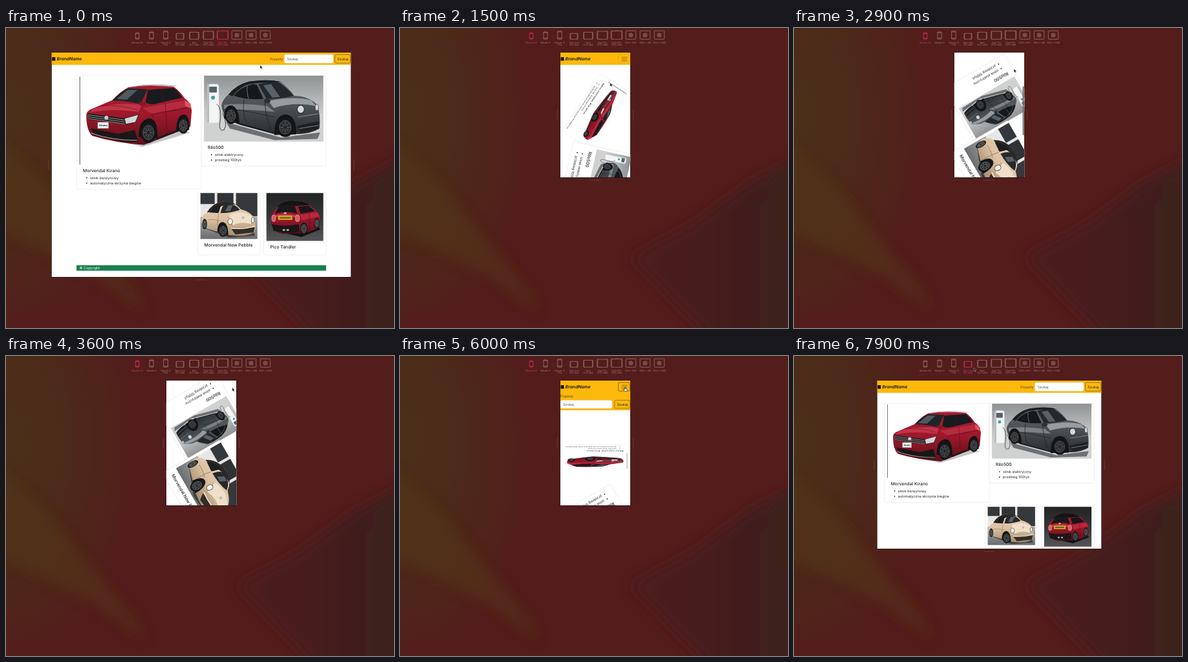
An HTML page for the animation above (8 s loop, 600 by 464 pixels).

```html
<!DOCTYPE html>
<html lang="pl">
<head>
<meta charset="utf-8">
<style>
html, body { margin: 0; width: 100%; height: 100%; overflow: hidden; background: #531d1c; }
svg { display: block; font-family: Inter, "Liberation Sans", sans-serif; text-rendering: geometricPrecision; }
.dev { color: #a9827e; }
.dev.on { color: #e5386a; }
</style>
</head>
<body>
<svg id="stage" width="600" height="464" viewBox="0 0 600 464"></svg>
<script>
const TOP = 38;

// ---- small builders ----
const text = (x, y, s, size = 5.42, more = '') => `<text x="${x}" y="${y}" font-size="${size}" ${more}>${s}</text>`;
const rect = (x, y, w, h, fill, more = '') => `<rect x="${x}" y="${y}" width="${w}" height="${h}" fill="${fill}" ${more}/>`;
const path = (d, fill, more = '') => `<path d="${d}" fill="${fill}" ${more}/>`;
const line = (d, color, w = 1) => path(d, 'none', `stroke="${color}" stroke-width="${w}" stroke-linecap="round"`);
const oval = (x, y, rx, ry, fill, more = '') => `<ellipse cx="${x}" cy="${y}" rx="${rx}" ry="${ry}" fill="${fill}" ${more}/>`;
const wheel = (x, y, rx, ry) => oval(x, y, rx, ry, '#151618') +
  oval(x, y, rx * .7, ry * .7, '#2b2d30', 'stroke="#6d7174" stroke-width=".7"') +
  line(`M${x - rx * .6} ${y}h${rx * 1.2}M${x} ${y - ry * .6}v${ry * 1.2}M${x - rx * .4} ${y - ry * .4}l${rx * .8} ${ry * .8}M${x + rx * .4} ${y - ry * .4}l${-rx * .8} ${ry * .8}`, '#7d8184', .6) +
  oval(x, y, rx * .18, ry * .18, '#222');
const fade = (id, flat, ...stops) => `<linearGradient id="${id}" x2="${flat}" y2="${1 - flat}">${stops.map((c, i) =>
  `<stop offset="${i / (stops.length - 1)}" stop-color="${c}"/>`).join('')}</linearGradient>`;

// ---- car pictures: width, height, drawing ----
const suv = { w: 184.5, h: 137.5, art:
  rect(.5, 1.5, .9, 136, '#444') +
  path('M16 90L98 110L172 88L150 82Z', '#c4c4c4') +
  path('M11 62Q11 55 18 52L32 46L51 38Q64 24 76 18Q104 13 146 17Q156 24 163 35Q173 41 174 54L172 78Q168 84 154 86L124 98L100 107Q56 104 20 93Q11 84 11 62Z', 'url(#red)') +
  path('M22 51Q58 40 97 45L92 56Q50 50 16 57Z', '#c23347') + line('M34 47Q64 44 90 53', '#861526', .8) +
  path('M51 38.5Q64 25 76 19.5L106 21Q100 32 95 44Q70 38 51 38.5Z', '#1f2428') + path('M58 36L75 22L90 22L74 37Z', '#525a60') +
  path('M106 22L146 19Q155 26 159 34L116 44Q102 45 103 39Z', '#171b1e') +
  line('M127 21L130 41M147 20L151 36', '#3d1018', 1.3) + line('M80 17.5Q112 11.5 148 16', '#a5a6a8', 1.1) +
  path('M98 50L166 38L172 47L112 59Z', '#b52b3f') + line('M112 60L172 49', '#62101c', .9) + line('M133 44L136 88M112 60Q119 72 120 92', '#5c0f1a', .7) +
  path('M13 58L70 66L71 75L15 68Z', '#1d191b') + line('M14 60.5L70 68.5M14 63.5L70 71.5M15 66.5L70 74.5', '#c3c4c6', .7) +
  path('M70 66L92 60L87 72L72 75Z', '#d2d6d9', 'stroke="#221" stroke-width=".9"') +
  path('M17 81L60 90L86 84L91 102L70 102L24 92Z', '#1a1719') + line('M19 89Q50 100 89 100', '#c2c4c5', .9) +
  oval(42, 65, 3, 3, '#c9ccce') +
  rect(28.5, 72, 17, 9.5, '#f6f6f6', 'stroke="#555" stroke-width=".4"') + text(31, 78.5, 'Kirano', 4, 'font-weight="700"') +
  line('M120 97L155 84', '#1a1a1c', 3) + path('M92 95Q92 67 109 66Q122 68 121 96Z', '#141214') + path('M150 84Q151 59 163 60Q171 63 170 84Z', '#141214') +
  path('M163 38L172 43L173 51L164 47Z', '#e0505c') + path('M92 41L103 40L104 45L95 47Z', '#8b1526') +
  wheel(107, 88, 12, 16) + wheel(161, 77, 8.5, 12.5) };

const city = { w: 185, h: 102, art:
  rect(0, 0, 185, 102, 'url(#wall)') + path('M0 70L185 58V102H0Z', '#d0d1d1') +
  path('M34 72L120 96L180 88L176 98L110 100L40 82Z', '#6d7072') +
  rect(5, 13, 18, 60, '#f3f5f5', 'rx="4"') + rect(8, 17, 12, 9, '#526367', 'rx="1"') + oval(14, 34, 3, 3, '#3aa59b') +
  rect(5, 13, 3, 60, '#b5babb', 'rx="1.5"') + line('M20 44Q28 50 25 70Q22 88 31 84Q37 76 29 58', '#3f4446', 1) +
  path('M27 46Q29 36 38 29Q50 14 70 9Q98 5 118 9Q130 18 140 31Q164 32 176 46Q181 62 179 82Q162 92 140 90L112 89L54 74Q30 70 27 46Z', 'url(#steel)') +
  path('M38 29Q50 14 70 9Q98 5 118 9L111 12Q82 9 64 15Q50 23 44 32Z', '#1b1d1f') +
  path('M46 31Q56 18 76 13L82 14L92 36Q66 38 46 31Z', '#16191b') + path('M84 13Q104 9 117 11Q130 20 139 31Q118 36 97 36Z', '#22282c') +
  path('M92 15L104 13L118 33L106 34Z', '#596166') + line('M67 15Q66 26 69 35M83 13L95 37', '#5d6366', 1.2) +
  path('M100 39Q140 31 166 38L174 47Q140 40 108 50Z', '#969da1') + path('M31 45Q60 42 98 47L110 56Q70 52 31 52Z', '#7b8286') +
  line('M62 37Q59 60 66 74M94 38Q95 62 104 84M31 52Q60 52 108 64', '#1f2224', .8) + line('M56 75L112 90', '#141617', 2.4) +
  path('M144 78L178 71L177 83L150 89Z', '#1e2123') + line('M148 82L177 77M146 64L177 59', '#9ca2a5', .8) +
  oval(150, 52, 5.5, 6.2, '#d4d9db', 'stroke="#2a2d2f" stroke-width="1.1"') + oval(175, 49, 2.6, 5, '#d4d9db', 'stroke="#2a2d2f" stroke-width=".7"') +
  oval(98, 39, 5, 3.5, '#2d3134') + path('M109 92Q109 60 127 60Q144 62 143 91Z', '#131516') + path('M31 66Q31 45 43 46Q55 50 55 76Z', '#131516') +
  wheel(126, 80, 13, 15) + wheel(42, 62, 9.5, 13) };

const round = { w: 88, h: 71, art:
  rect(0, 0, 88, 71, '#e6e6e6') + rect(0, 0, 22, 17, '#35383b') + rect(26, 0, 25, 20, '#303336') + rect(55, 0, 33, 36, '#36383b') +
  rect(0, 37, 88, 34, 'url(#floor)') + path('M6 54L44 69L84 66L82 60L40 58Z', '#3f4042') +
  path('M1 42Q3 33 11 30Q18 16 33 13.5Q53 12 62 25Q78 29 83 39Q87 50 84 60Q74 67 56 66L44 65L10 55Q1 51 1 42Z', 'url(#cream)') +
  path('M10 30Q18 16 33 13.5Q47 12 55 18Q34 15 20 29Z', '#2b2725') + path('M14 30Q20 20 32 17.5L28 31Z', '#1c1e20') +
  path('M31 31Q33 20 38 17.5Q53 15 61 26Q48 31 31 31Z', '#25292c') + path('M38 28L43 19L50 19L46 28Z', '#596065') +
  path('M44 34Q64 25 80 36L78 48Q64 43 50 50Z', '#efdfc9') + line('M28 33Q25 46 27 59M12 41Q20 40 30 43', '#927a60', .7) +
  line('M42 36Q48 44 52 58', '#a88f72', .7) + path('M48 56L84 53L82 61L54 64Z', '#332d29') + line('M48 54Q66 57 84 51', '#f4ead9', 1.3) +
  oval(46, 44, 3.6, 4.6, '#f2f3f3', 'stroke="#5d5247" stroke-width=".9"') + oval(81, 42, 2.2, 4.3, '#f2f3f3', 'stroke="#5d5247" stroke-width=".9"') +
  oval(66, 38, 2.1, 2.1, '#b9bcbe') + path('M26 60Q27 44 35 45Q43 47 43 66Z', '#191614') + wheel(35, 58, 7.2, 9.8) + wheel(6.5, 48, 3.8, 8) };

const hatch = { w: 88, h: 74, art:
  rect(0, 0, 88, 74, 'url(#dark)') + path('M10 58L54 68L84 56L76 50Z', '#111213') +
  path('M7 44Q8 30 15 25Q20 15 32 13Q54 11 66 18L77 28Q84 33 83 46L79 55L60 62L26 63Q8 60 7 44Z', 'url(#red)') +
  path('M16 22Q22 14 34 12.5Q56 11 67 18.5L46 20Q30 17 16 22Z', '#121314') + path('M13 32L19 21Q33 17 44 20L48 32Q30 27 13 32Z', '#17191b') +
  path('M49 21L65 19.5L75 28L53 32Z', '#141618') + line('M62 20L66 30', '#4a0d17', 1) +
  path('M10 35Q28 30 47 35L47 38Q28 33 9 39Z', '#cf3a4c') + path('M53 34L79 30L82 36L55 42Z', '#b9283b') +
  rect(18, 35, 22, 6.5, '#cfae2b', 'rx=".6"') + rect(20.5, 37.3, 17, 2, '#5f5118') +
  rect(8.5, 34, 5.5, 10, '#e4565a', 'rx="2.6" stroke="#c6c6c6" stroke-width=".7"') + rect(45, 34, 6, 10, '#e4565a', 'rx="2.6" stroke="#c6c6c6" stroke-width=".7"') +
  path('M8 48Q28 53 50 48L51 60Q28 64 11 58Z', '#1b1618') + oval(27, 57, 2, 1.6, '#a9acae') + oval(33, 57, 2, 1.6, '#a9acae') + oval(29, 31, 2, 1.3, '#c9cbcd') +
  line('M66 32L67 56', '#5a101b', .7) + wheel(58, 55, 5.5, 9.5) + wheel(78, 47, 4, 8.5) };

// ---- page parts ----
const CARS = [
  [suv, 'Morvendal Kirano', ['silnik benzynowy', 'automatyczna skrzynia biegów']],
  [city, 'Rilo500', ['silnik elektryczny', 'przebieg 100tyś']],
  [round, 'Morvendal New Pebble', []],
  [hatch, 'Pico Tandler', []]
];
const cardHeight = (i, w) => CARS[i][0].h * (w - 8.5) / CARS[i][0].w + 22 + 8.15 * CARS[i][2].length;

function card(i, w, h = cardHeight(i, w), title = CARS[i][1]) {
  const [pic, , items] = CARS[i], k = (w - 8.5) / pic.w, y = pic.h * k;
  return rect(0, 0, w, h, '#fff', 'rx="1.4" stroke="#dfdfdf" stroke-width=".5"') +
    `<g transform="translate(4.2 .3) scale(${k})">${pic.art}</g>` +
    text(10, y + 12, title, 6.78, 'font-weight="500"') +
    items.map((s, n) => oval(15.8, y + 20.8 + n * 8.15, .9, .9, '#212529') + text(21, y + 22.7 + n * 8.15, s)).join('');
}
const at = (x, y, s) => `<g transform="translate(${x} ${y})">${s}</g>`;

const field = (x, y, w, h) => rect(x, y, w, h, '#fff', 'rx="2" stroke="#ced4da" stroke-width=".4"') + text(x + 4, y + h / 2 + 2, 'Szukaj', 5.42, 'fill="#555"');
const button = (x, y, h) => rect(x, y, 24, h, 'none', 'rx="2" stroke="#333" stroke-width=".5"') + text(x + 3.6, y + h / 2 + 2, 'Szukaj');
const brand = x => rect(x + .8, 45.2, 5, 5.4, '#111') + text(x + 8, 50.2, 'BrandName', 6.78, 'font-weight="600" font-style="italic" fill="#111"');
const footer = (x, y, w) => rect(x, y, w, 8.4, '#17804b') + text(x + 4.5, y + 6.2, '© Copyright', 5.42, 'fill="#fff"');

function page(id, w, h, body) {
  const x = 302 - w / 2, mid = TOP + h / 2, end = x + w;
  return `<g id="${id}">` +
    rect(x - .5, TOP - .5, w + 1, h + 1.2, '#2c1010') +
    `<svg x="${x}" y="${TOP}" width="${w}" height="${h}" viewBox="${x} ${TOP} ${w} ${h}" fill="#212529">` +
    rect(x, TOP, w, h, '#fff') + body(x, end) + '</svg>' +
    line(`M${x - 4.5} ${mid - 8}v16M${end + 4.7} ${mid - 8}v16M294 ${TOP + h + 4.5}h16`, '#70403d', .8) + '</g>';
}

function desktop(id, w, h, margin, small, rowY, foot, title) {
  return page(id, w, h, (x, end) => {
    const left = x + margin, right = end - margin, cw = (right - left) / 2, sh = cardHeight(3, small);
    return rect(x, TOP, w, 19, '#fdb80c') + brand(x) + text(end - 125.3, 49.8, 'Pojazdy', 5.42, 'fill="#5c4a1c"') +
      field(end - 103, 41, 75.5, 13.3) + button(end - 24.8, 41, 13.3) +
      at(left, 73.5, card(0, cw)) + at(left + cw, 73.5, card(1, cw)) +
      at(right - 2 * small - 5.5, rowY, card(2, small, sh, title)) + at(right - small, rowY, card(3, small, sh)) +
      footer(left, foot, right - left);
  });
}

// phone cards: centre x, centre y, final angle, final squeeze
const CW = 107.5;
const SPINS = [[302, 129, 180, .33], [302, 238, 150, 1], [313, 346, 60, 1], [311, 452, 30, 1]];

const phone = page('phone', 108.4, 193, x =>
  '<g id="scroll">' + rect(x, TOP, 109, 19, '#fdb80c', 'id="bar"') + brand(x) +
  rect(337.5, 41, 18, 13.2, 'none', 'id="toggle" rx="1.8" stroke-width=".6"') +
  line('M343 45.2h8M343 48h8M343 50.8h8', '#75581a', .8) +
  `<svg id="menu" x="${x}" y="57" width="109" height="27" overflow="hidden">` +
  text(.2, 6.5, 'Pojazdy', 5.42, 'fill="#5c4a1c"') + field(.2, 11.4, 80, 12.6) + button(84, 11.4, 12.6) + '</svg>' +
  '<g id="cards">' + SPINS.map((s, i) => `<g class="spin">${card(i, CW)}</g>`).join('') + footer(252, 511, 100) + '</g></g>' +
  rect(0, 0, 2, 76, '#6b6b6b', 'id="thumb" rx="1"'));

// ---- toolbar: centre x, width, height, label lines ----
const DEVICES = [
  [203, 5.5, 10, 'Movelo 5S'], [225, 6, 11.3, 'Movelo 6'], [247, 6.6, 12.6, 'Movelo 6|Plus'],
  [269, 12, 9, 'Tavo mini|(7,9 cala)'], [291, 14.5, 10.8, 'Tavo|(9,7 cala)'],
  [313, 16.3, 12.2, 'Tavo Pro|(10,5 cala)'], [335, 17.3, 12.8, 'Tavo Pro|(12,9 cala)'],
  [357, 15.5, 13, '800 × 600'], [379, 15.5, 13, '1366 × 768'], [401, 15.5, 13, '1920 × 1080']
];
const device = ([x, w, h, label], i) => '<g class="dev" fill="currentColor">' +
  rect(x - w / 2, 17.3 - h, w, h, 'none', 'rx="1" stroke="currentColor" stroke-width=".7"') +
  (i < 3 ? line(`M${x - w / 2} ${18.6 - h}h${w}M${x - w / 2} 15.8h${w}`, 'currentColor', .7)
    : i < 7 ? line(`M${x - w / 2 + .8} ${17.3 - h}v${h}M${x + w / 2 - .8} ${17.3 - h}v${h}`, 'currentColor', .6)
    : oval(x, 11, 3.6, 3.6, '#774c49')) +
  label.split('|').map((s, n) => text(x, 24 + n * 3.4, s, 3.5, 'text-anchor="middle"')).join('') + '</g>';

const backdrop = rect(0, 0, 600, 464, '#531d1c') + rect(0, 0, 260, 440, 'url(#olive)') + '<g filter="url(#soft)">' +
  path('M-60 130L60 240L198 405L214 440L140 385L-60 285Z', '#55361a', 'opacity=".5"') +
  path('M357 354L450 305L540 240L640 190V500H500Z', 'url(#dusk)') + '</g>';

stage.innerHTML = '<defs><filter id="soft" x="-30%" y="-30%" width="160%" height="160%"><feGaussianBlur stdDeviation="10"/></filter>' +
  '<radialGradient id="olive" cx="0" cy=".3" r=".8"><stop stop-color="#4b3019"/><stop offset=".45" stop-color="#4c2a19"/><stop offset="1" stop-color="#531d1c"/></radialGradient>' +
  fade('dusk', 1, '#4d1d1c', '#451f1e', '#38201f') + fade('wall', 0, '#8f9294', '#c2c4c5', '#dcdddd') + fade('floor', 0, '#a9a9aa', '#6c6d6f') +
  fade('dark', 0, '#222325', '#343537', '#555657') + fade('red', 0, '#a81c30', '#9c182a', '#5e0f1b') +
  fade('steel', 0, '#5f6568', '#4b5053', '#2a2d2f') + fade('cream', 0, '#e4cfb3', '#dcc2a3', '#a68b6e') + '</defs>' +
  backdrop + DEVICES.map(device).join('') +
  desktop('large', 463, 347, 38.5, 96.5, 255, 367, 'Morvendal New Pebble') + phone +
  desktop('medium', 347, 260, 11.2, 81.7, 233, 330, 'Morvendal New') +
  '<g id="cursor"><g id="arrow">' + path('M0 0V5.4L1.3 4.3L2.2 6.3L3.1 5.9L2.2 4H3.9Z', '#000', 'stroke="#fff" stroke-width=".4"') + '</g>' +
  '<g id="hand">' + path('M-.6 0Q0 -.7 .6 0V2.2L3 2.8Q3.6 3.2 3.3 4.4L2.7 6.2H-.6L-2.4 3.6Q-2.2 2.8 -.6 3.6Z', '#fff', 'stroke="#111" stroke-width=".6"') + '</g></g>';

// ---- motion ----
const CURSOR = [[0, 393, 57.5], [300, 345, 13], [850, 204, 12], [1100, 204, 13], [1450, 325, 85], [2500, 326, 84],
  [3200, 349.5, 50], [4400, 351, 46.5], [5400, 348, 48], [6700, 348, 49], [7350, 278, 18], [8000, 278, 18]];
const SCROLL = [[0, 0], [1750, 0], [2400, 78], [3100, 144], [3750, 144], [4300, 50], [4800, 0], [8000, 0]];
const MENU = [[0, 0], [5600, 0], [5900, 1], [6600, 1], [6900, 0], [8000, 0]];

const smooth = u => u * u * (3 - 2 * u);
function track(keys, t, col = 1) {
  const i = keys.findIndex(k => k[0] > t), a = keys[i - 1], b = keys[i];
  return a[col] + (b[col] - a[col]) * smooth((t - a[0]) / (b[0] - a[0]));
}
// the CSS "ease" curve
function ease(x) {
  if (x <= 0 || x >= 1) return x <= 0 ? 0 : 1;
  let lo = 0, hi = 1, s;
  const bez = (a, b) => 3 * a * s * (1 - s) ** 2 + 3 * b * s * s * (1 - s) + s ** 3;
  for (let n = 0; n < 20; n++) { s = (lo + hi) / 2; bez(.25, .25) < x ? lo = s : hi = s; }
  return bez(.1, 1);
}
const $ = id => document.getElementById(id);
const show = (id, on) => $(id).style.display = on ? '' : 'none';
const move = (id, x, y) => $(id).setAttribute('transform', `translate(${x} ${y})`);
const devs = [...document.querySelectorAll('.dev')], spins = [...document.querySelectorAll('.spin')];

function draw() {
  const t = performance.now() % 8000;
  const mode = t < 1050 ? 'large' : t < 7500 ? 'phone' : 'medium';
  for (const id of ['large', 'phone', 'medium']) show(id, id === mode);
  const chosen = { large: 6, phone: 0, medium: 3 }[mode];
  devs.forEach((d, i) => d.classList.toggle('on', i === chosen));

  const p = ease((t - 1100) / 1000), off = track(SCROLL, t), open = track(MENU, t);
  spins.forEach((g, i) => {
    const [x, y, angle, squeeze] = SPINS[i], sy = 1 - (1 - squeeze) * p ** .6;
    g.setAttribute('transform', `translate(${x} ${y}) rotate(${angle * p}) scale(1 ${sy}) translate(${-CW / 2} ${-cardHeight(i, CW) / 2})`);
  });
  move('scroll', 0, -off);
  move('cards', 0, 27 * open);
  $('bar').setAttribute('height', 19 + 27 * open);
  $('menu').setAttribute('height', 27 * open);
  show('menu', open > 0);
  $('toggle').setAttribute('stroke', t > 5600 ? '#4a3a10' : '#d9a018');

  const x = track(CURSOR, t), y = track(CURSOR, t, 2), wide = x > 348.5;
  show('thumb', (t > 1750 && t < 3400) || (t > 3750 && t < 5000));
  $('thumb').setAttribute('width', wide ? 3.4 : 2);
  move('thumb', wide ? 351.8 : 353.6, TOP + .4 + off * .394);

  const overButton = t > 5300 && t < 6850;
  show('arrow', !overButton);
  show('hand', overButton);
  move('cursor', x, y);
  requestAnimationFrame(draw);
}
draw();
</script>
</body>
</html>
```
